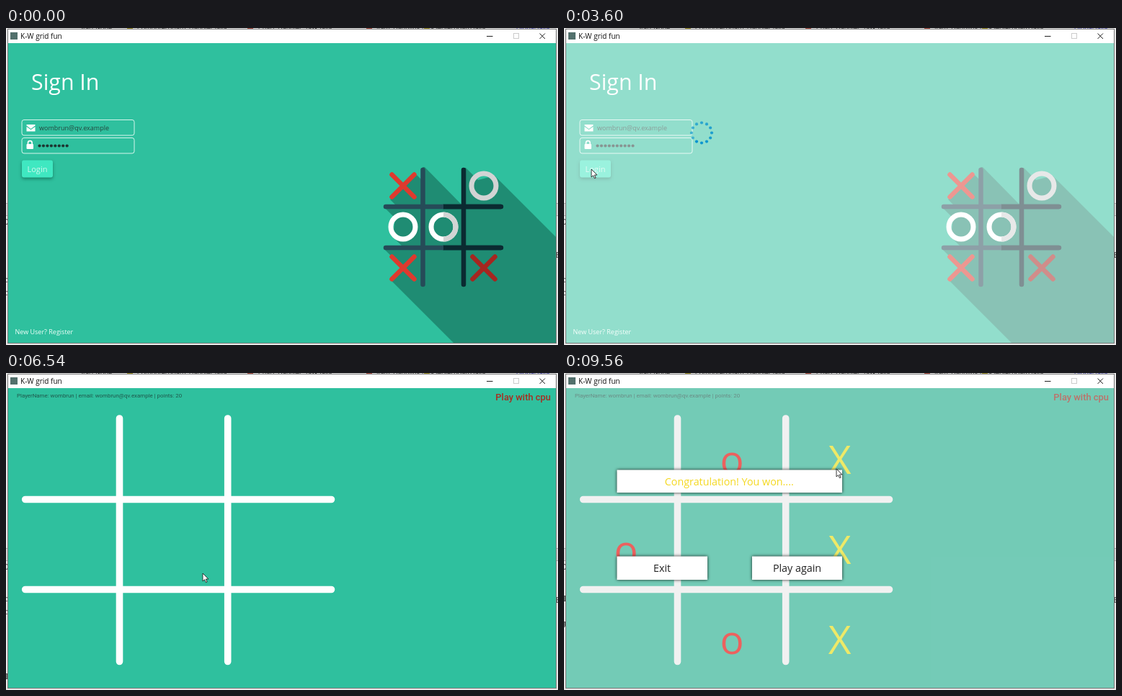
Animation of 766 by 440 pixels, one loop 9.58 s. Source, as an HTML page:

```html
<!DOCTYPE html>
<html lang="en">
<head>
<meta charset="utf-8">
<title>Grid game</title>
<style>
html, body { margin: 0; width: 100%; height: 100%; overflow: hidden; background: #e4e4e4; }
svg { display: block; width: 766px; height: 440px; font-family: "Open Sans", "Noto Sans", sans-serif; }
text { white-space: pre; }
.tabs { font-size: 9px; fill: #333; }
.log { font: 13px "Liberation Serif", serif; fill: #222; }
.json { font: 13.33px "Liberation Mono", monospace; fill: #222; }
.small { font-size: 9px; }
.mid { text-anchor: middle; font-size: 14.3px; }
.mark { text-anchor: middle; font-size: 55px; }
.panel { fill: #fff; filter: drop-shadow(0 0 2px rgba(0, 0, 0, .85)); }
.login { fill: #3fe8c1; filter: drop-shadow(0 2px 2px rgba(0, 60, 45, .5)); }
.line { fill: none; stroke-linecap: round; }
</style>
</head>
<body>
<svg viewBox="0 0 766 440">
  <defs>
    <path id="cross" d="M-15.5-15.5 15.5 15.5M15.5-15.5-15.5 15.5" fill="none" stroke-width="6.5" stroke-linecap="round"/>
    <circle id="ring" r="17" fill="none" stroke-width="7"/>
  </defs>

  <!-- desktop behind the window -->
  <rect width="766" height="440" fill="#e8e8e8"/>
  <rect y="243" width="766" height="17" fill="#d6d6d6"/>
  <path d="M0 243.5H766M0 260.5H766" stroke="#a8a8a8"/>
  <g class="tabs">
    <text x="102" y="2.5">Start Node</text>
    <text x="182" y="2.5">ComputerBoard_Handler.java</text>
    <text x="350" y="2.5">Chart_Handler_Task.java</text>
    <text x="514" y="2.5">Ram_Handling.java</text>
    <text x="594" y="2.5">ServerBoard.java</text>
    <text x="708" y="2.5" fill="#33b">Global.java</text>
  </g>
  <path d="M168 1h8M580 1h8" stroke="#a89a30" stroke-width="2"/>
  <path d="M335 1h8M500 1h8" stroke="#b5564a" stroke-width="2"/>
  <text class="log" x="-6" y="273" font-weight="bold">C</text>
  <g id="logs"></g>

  <!-- window frame -->
  <rect x="2.5" y="1.5" width="761" height="436" fill="#fff" stroke="#777"/>
  <rect x="6" y="6" width="10" height="10" fill="#52706c"/>
  <text x="20" y="14.5" font-size="10" fill="#111">K-W grid fun</text>
  <path d="M667 11.5H675.5M740.5 7.5 748 15M748 7.5 740.5 15" stroke="#222" fill="none"/>
  <rect x="704.5" y="7.5" width="7" height="7" fill="none" stroke="#ccc"/>

  <g id="signPage">
    <rect x="3" y="21" width="760" height="416" fill="#fff"/>
    <g id="sign">
      <rect x="3" y="21" width="760" height="416" fill="#2fc09e"/>
      <text x="35" y="86" font-size="30.3" fill="#fff">Sign In</text>
      <g fill="none" stroke="#d5f5ec">
        <rect x="22" y="127.5" width="156" height="21.5" rx="3"/>
        <rect x="22" y="152.5" width="156" height="21.5" rx="3"/>
      </g>
      <path d="M28.5 134H40.5V135.5L34.5 140 28.5 135.5ZM28.5 137 34.5 141.3 40.5 137V143.5H28.5Z" fill="#fff"/>
      <path d="M30.5 161.5V159.5a2.8 2.8 0 0 1 5.6 0V161.5" fill="none" stroke="#fff" stroke-width="1.7"/>
      <rect x="28.5" y="161" width="9.5" height="7" rx="1" fill="#fff"/>
      <text class="small" x="46" y="141.5" fill="#24463e">wombrun@qv.example</text>
      <g id="dots" fill="#1d3632"></g>
      <rect class="login" x="22" y="183.5" width="43" height="24" rx="3"/>
      <text x="29.5" y="200" font-size="11" fill="#d2f8ee">Login</text>
      <text class="small" x="12.5" y="425" fill="#f0fffa">New User? Register</text>
      <path fill="#1f8c73" d="M570 204 578 212V248H543L533 238ZM578 193H581L635 248H578ZM526 250 540 264 537 290 552 305H635V248H526ZM526 308 551 333 534 350 621 437H763V290L678 205 655 211 638 194H635V305H526Z"/>
      <g class="line" stroke-width="6.5">
        <path d="M635 197V356M607 248H687M607 305H687" stroke="#0b2a31"/>
        <path d="M607 248H527M607 305H527" stroke="#264b58"/>
        <path d="M578.5 197V356" stroke="#264b58"/>
        <path d="M607 248H687M607 305H687" stroke="#0b2a31" stroke-linecap="butt"/>
      </g>
      <g stroke="#de3a2e">
        <use href="#cross" x="551" y="219"/>
        <use href="#cross" x="551" y="333"/>
      </g>
      <use href="#cross" x="663" y="333" stroke="#a62620"/>
      <use href="#ring" x="663" y="219" stroke="#d2d4d4"/>
      <use href="#ring" x="551" y="276" stroke="#fff"/>
      <use href="#ring" x="607" y="276" stroke="#fff"/>
      <path d="M607 259a17 17 0 0 1 0 34" fill="none" stroke="#d2d4d4" stroke-width="7"/>
    </g>
    <g id="spinner" fill="#0793cf"></g>
  </g>

  <g id="gamePage">
    <rect x="3" y="21" width="760" height="416" fill="#dcdcdc"/>
    <g id="game">
      <rect x="3" y="21" width="760" height="416" fill="#2fc09e"/>
      <path class="line" d="M157.5 63V400.5M307.7 63V400.5M26.7 175.5H451.5M26.7 300.5H451.5" stroke="#fff" stroke-width="9.6"/>
      <text x="756" y="38" text-anchor="end" font-family="Roboto, sans-serif" font-weight="500" font-size="12.9" fill="#a92c20">Play with cpu</text>
      <text id="player" x="15" y="34" font-family="Roboto, sans-serif" font-size="7.9" fill="#1f574b">PlayerName: wombrun | email: wombrun@qv.example | points: 20</text>
      <g id="marks"></g>
    </g>
    <g id="dialog">
      <rect class="panel" x="73.5" y="134.5" width="312.5" height="31.5"/>
      <rect class="panel" x="73.5" y="254.5" width="125.5" height="32.5"/>
      <rect class="panel" x="261" y="254.5" width="125" height="32.5"/>
      <text id="message" class="mid" x="229.3" y="156" fill="#f4d81f"></text>
      <text class="mid" x="136" y="276" fill="#222">Exit</text>
      <text class="mid" x="323.5" y="276" fill="#222">Play again</text>
    </g>
  </g>

  <path id="cursor" d="M0 0V11L2.6 8.7 4.4 12.7 6.1 12 4.4 8H7.9Z" fill="#fff" stroke="#222" stroke-width=".9"/>
</svg>
<script>
const LOOP = 9580;
const $ = id => document.getElementById(id);

function add(parent, tag, attrs, text = '') {
  const el = document.createElementNS('http://www.w3.org/2000/svg', tag);
  for (const key in attrs) el.setAttribute(key, attrs[key]);
  el.textContent = text;
  return parent.appendChild(el);
}
const show = (el, on) => { el.style.display = on ? '' : 'none'; };
const ramp = (t, a, b) => Math.min(1, Math.max(0, (t - a) / (b - a)));
const ease = u => u * u * (3 - 2 * u);

// [time, x, y] of the pointer tip
const path = [
  [1700, -12, 160], [1820, 1, 163], [2080, 22, 172], [2300, 34, 186],
  [3020, 38, 196], [4000, 38, 196], [4900, 330, 172], [5400, 341, 181],
  [5860, 325, 268], [6060, 325, 268], [6540, 273, 278], [6800, 273, 278],
  [7460, 381, 238], [7640, 381, 238], [8040, 384, 350], [8480, 384, 350],
  [8900, 385, 215], [9120, 381, 136], [9400, 378, 133]
];

// [time, sign, x, baseline]
const moves = [
  [7600, 'X', 382.5, 264.5], [7680, 'o', 233, 390],
  [8300, 'X', 382.5, 389.5], [8340, 'o', 86, 265],
  [9120, 'X', 382.5, 139.5], [9160, 'o', 233, 140]
];
const marks = moves.map(([at, sign, x, y]) => ({
  at, el: add($('marks'), 'text', { class: 'mark', x, y, fill: sign === 'X' ? '#fbf31b' : '#f8110c' }, sign)
}));

// [from, to, text, x, baseline]
const json = '{"1":"1","2":200,"3":{"5":"wombrun","6":"wombrun@qv.example","8":0,"9":20}}';
const logs = [
  [0, 4000, 'c', -3, 353], [0, 4000, 'c', -3, 371], [0, 9580, 'E', 762, 319],
  [4000, 7600, 'c', -3, 317], [4000, 7600, 'c', -3, 335], [4000, 7600, 'I', -1, 425],
  [7600, 9440, 'I', -1, 353], [7600, 9440, 'J', -2, 389], [7600, 9440, json, 8, 446],
  [9440, 9580, 'I', -1, 317], [9440, 9580, 'J', -2, 353]
].map(([from, to, text, x, y]) => ({
  from, to, el: add($('logs'), 'text', { class: text === json ? 'json' : 'log', x, y }, text)
}));

const dots = Array.from({ length: 10 }, (_, i) =>
  add($('dots'), 'circle', { cx: 46.5 + 5.45 * i, cy: 163.5, r: 2.1 }));

const beads = Array.from({ length: 12 }, (_, i) => {
  const a = i * Math.PI / 6;
  return add($('spinner'), 'circle', { cx: 191 + 14 * Math.cos(a), cy: 145.5 + 14 * Math.sin(a), r: 2.1 });
});

function pointer(t) {
  const next = path.findIndex(p => p[0] > t);
  if (next === 0) return path[0].slice(1);
  if (next < 0) return path[path.length - 1].slice(1);
  const [t0, x0, y0] = path[next - 1], [t1, x1, y1] = path[next];
  const u = ease(ramp(t, t0, t1));
  return [x0 + (x1 - x0) * u, y0 + (y1 - y0) * u];
}

function render(t) {
  const inGame = t >= 4000;
  show($('signPage'), !inGame);
  show($('gamePage'), inGame);

  const typed = 8 + (t >= 400) + (t >= 900);
  dots.forEach((dot, i) => show(dot, i < typed));
  $('sign').style.opacity = 1 - .48 * ramp(t, 3240, 3560);
  show($('spinner'), t >= 3280);
  const head = Math.min(t, 3760) / 90;
  beads.forEach((bead, i) => {
    bead.style.opacity = 1 - .45 * (((head - i) % 12 + 12) % 12) / 12;
  });

  const won = t >= 9160;
  const dim = won ? ramp(t, 9180, 9400) : ramp(t, 4960, 5200) * (1 - ramp(t, 5960, 6160));
  $('game').style.opacity = 1 - .4 * dim;
  $('dialog').style.opacity = dim;
  $('message').textContent = won ? 'Congratulation! You won....' : 'No game started!';
  show($('player'), t >= 6000);
  marks.forEach(m => show(m.el, t >= m.at));
  logs.forEach(l => show(l.el, t >= l.from && t < l.to));

  const [x, y] = pointer(t);
  $('cursor').setAttribute('transform', `translate(${x} ${y})`);
}

const start = performance.now();
function tick() {
  render((performance.now() - start) % LOOP);
  requestAnimationFrame(tick);
}
tick();
</script>
</body>
</html>
```
